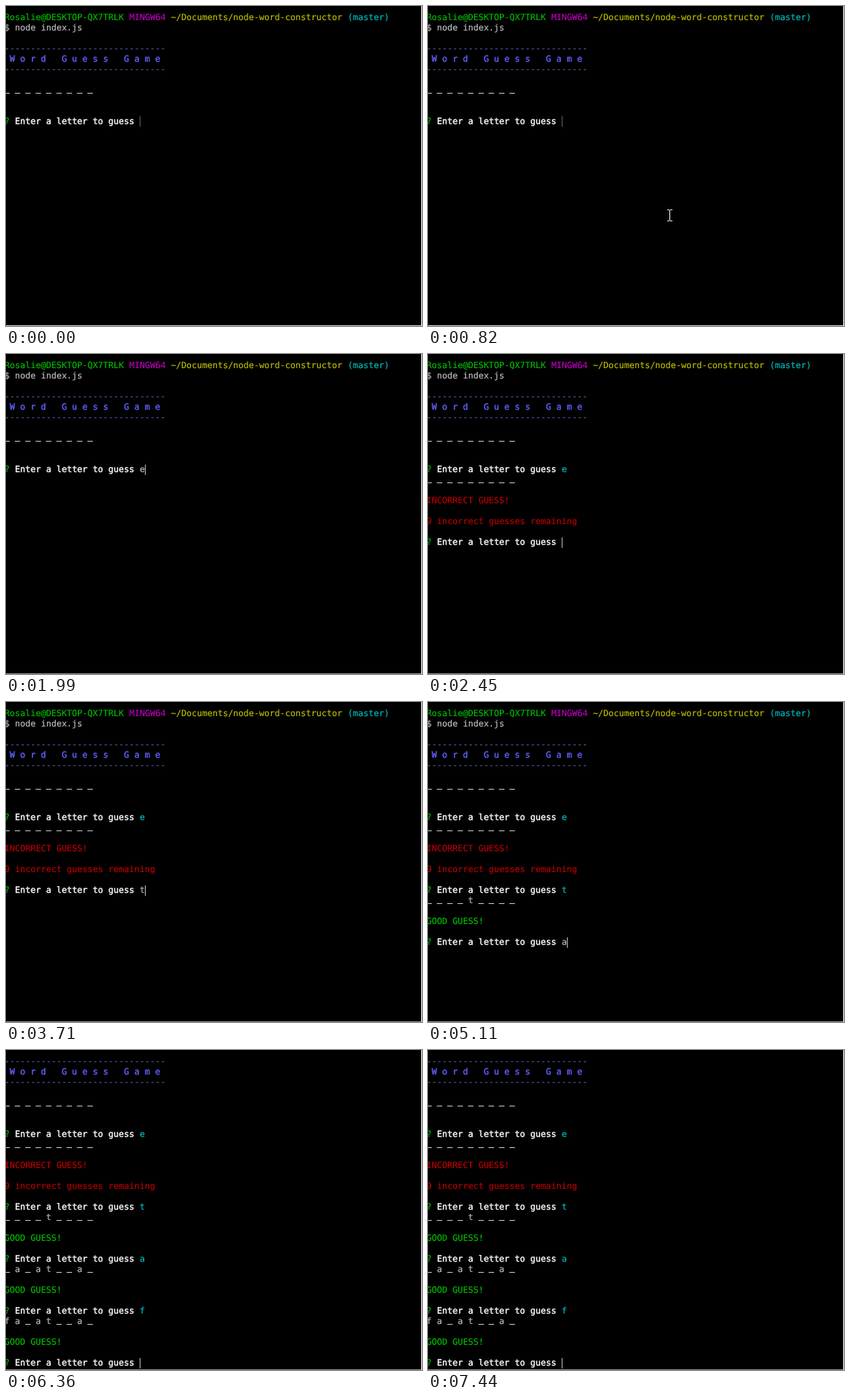
Write an HTML page that moves like this. It is 560x431 px and loops after 8000 ms.

```html
<!DOCTYPE html>
<html lang="en">
<head>
<meta charset="utf-8">
<title>Word guess terminal</title>
<style>
  html, body { margin: 0; width: 100%; height: 100%; overflow: hidden; background: #000; }
  svg { display: block; width: 560px; height: 431px; }
  text {
    font: 11.627px "DejaVu Sans Mono", "Noto Sans Mono", monospace;
    white-space: pre;
    text-rendering: geometricPrecision;
    stroke-width: .15px;
  }
  .strong { stroke-width: .4px; }
</style>
</head>
<body>
<svg viewBox="0 0 560 431" xmlns="http://www.w3.org/2000/svg">
  <g id="screen">
    <line id="caret" stroke="#bfbfbf" shape-rendering="crispEdges"/>
  </g>
  <rect id="frame" y="430" width="560" height="1"/>
  <rect x="559" width="1" height="431" fill="#fff"/>
  <circle id="click" cx="323" cy="281" r="12" fill="#ff0" fill-opacity=".47"/>
  <path id="pointer" d="M0 .5h3m1 0h3M3.5 1v14M0 15.5h3m1 0h3" fill="none" stroke="#fff" shape-rendering="crispEdges"/>
</svg>
<script>
const LOOP = 8000, CELL = 7, LINE = 14, LEFT = -2, TOP = 9;
const COLOR = {
  grey: '#bfbfbf', white: '#fff', green: '#00bf00', magenta: '#bf00bf', yellow: '#bfbf00',
  cyan: '#00bfbf', red: '#bf0000', blue: '#6060ff', rule: '#5c5ca8', blank: '#ccc'
};
const STRONG = ['white', 'blue', 'blank'];
const byId = id => document.getElementById(id);
const screen = byId('screen'), caret = byId('caret'), frame = byId('frame');
const click = byId('click'), pointer = byId('pointer');
const timed = [];

const show = (el, on) => el.setAttribute('visibility', on ? 'visible' : 'hidden');

function write(line, col, color, string, from = 0, to = LOOP, lift = 0) {
  const el = document.createElementNS('http://www.w3.org/2000/svg', 'text');
  el.setAttribute('x', LEFT + col * CELL);
  el.setAttribute('y', TOP + line * LINE + 10 - lift);
  el.setAttribute('fill', COLOR[color]);
  el.setAttribute('stroke', COLOR[color]);
  if (STRONG.includes(color)) el.setAttribute('class', 'strong');
  el.textContent = string;
  screen.insertBefore(el, caret);
  timed.push({ el, from, to });
}

// Blanks sit just under the baseline, so they are set apart from the letters.
function writeWord(line, word, from) {
  write(line, 0, 'grey', word.replace(/_/g, ' '), from);
  write(line, 0, 'blank', word.replace(/[^_]/g, ' '), from, LOOP, 2);
}

function ask(line, from, letter, typed, entered) {
  write(line, 0, 'green', '?', from);
  write(line, 2, 'white', 'Enter a letter to guess', from);
  if (!letter) return;
  write(line, 26, 'grey', letter, typed, entered);
  write(line, 26, 'cyan', letter, entered);
}

const writeRule = line => write(line, 0, 'rule', '-'.repeat(31), 0, LOOP, .3);

write(0, 0, 'green', 'Rosalie@DESKTOP-QX7TRLK');
write(0, 24, 'magenta', 'MINGW64');
write(0, 32, 'yellow', '~/Documents/node-word-constructor');
write(0, 66, 'cyan', '(master)');
write(1, 0, 'grey', '$ node index.js');
writeRule(3);
write(4, 1, 'blue', 'W o r d   G u e s s   G a m e');
writeRule(5);
writeWord(7, '_ _ _ _ _ _ _ _ _', 0);
ask(10, 0, 'e', 1920, 2380);

writeWord(11, '_ _ _ _ _ _ _ _ _', 2380);
write(13, 0, 'red', 'INCORRECT GUESS!', 2380);
write(15, 0, 'red', '9 incorrect guesses remaining', 2380);
ask(17, 2380, 't', 3710, 4010);

writeWord(18, '_ _ _ _ t _ _ _ _', 4010);
write(20, 0, 'green', 'GOOD GUESS!', 4010);
ask(22, 4010, 'a', 5110, 5340);

writeWord(23, '_ a _ a t _ _ a _', 5340);
write(25, 0, 'green', 'GOOD GUESS!', 5340);
ask(27, 5340, 'f', 6130, 6360);

writeWord(28, 'f a _ a t _ _ a _', 6360);
write(30, 0, 'green', 'GOOD GUESS!', 6360);
ask(32, 6360);

// Caret states: start time, line, column, lit
const caretStates = [
  [0, 10, 26, 1], [1690, 10, 26, 0], [1920, 10, 27, 1],
  [2380, 17, 26, 1], [3000, 17, 26, 0], [3460, 17, 26, 1], [3710, 17, 27, 1],
  [4010, 22, 26, 1], [4560, 22, 26, 0], [5110, 22, 27, 1],
  [5340, 27, 26, 1], [5810, 27, 26, 0], [6130, 27, 27, 1],
  [6360, 32, 26, 1], [6910, 32, 26, 0], [7440, 32, 26, 1]
];

function drawCaret(t) {
  const [, line, col, lit] = caretStates.filter(s => s[0] <= t).pop();
  const x = LEFT + col * CELL + .5, y = TOP + line * LINE;
  caret.setAttribute('x1', x);
  caret.setAttribute('x2', x);
  caret.setAttribute('y1', y);
  caret.setAttribute('y2', y + LINE);
  caret.setAttribute('stroke-dasharray', t < 1140 ? '1 1' : 'none');
  show(caret, lit);
}

function drawPointer(t) {
  const step = Math.min(4, Math.max(0, Math.floor((t - 500) / 80)));
  const rest = (1 - step / 4) ** 2;
  const x = Math.round(322 + 103 * rest), y = Math.round(274 + 113 * rest);
  pointer.setAttribute('transform', `translate(${x} ${y})`);
  show(pointer, t >= 500 && t < 1920);
  show(click, t >= 1140 && t < 1370);
}

function render(t) {
  for (const { el, from, to } of timed) show(el, t >= from && t < to);
  screen.setAttribute('transform', `translate(0 ${t < 6360 ? 0 : -3 * LINE})`);
  frame.setAttribute('fill', t < 1140 ? '#d0d0d0' : '#8a8a8a');
  drawCaret(t);
  drawPointer(t);
}

const start = performance.now();
function tick() {
  render((performance.now() - start) % LOOP);
  requestAnimationFrame(tick);
}
tick();
</script>
</body>
</html>
```
